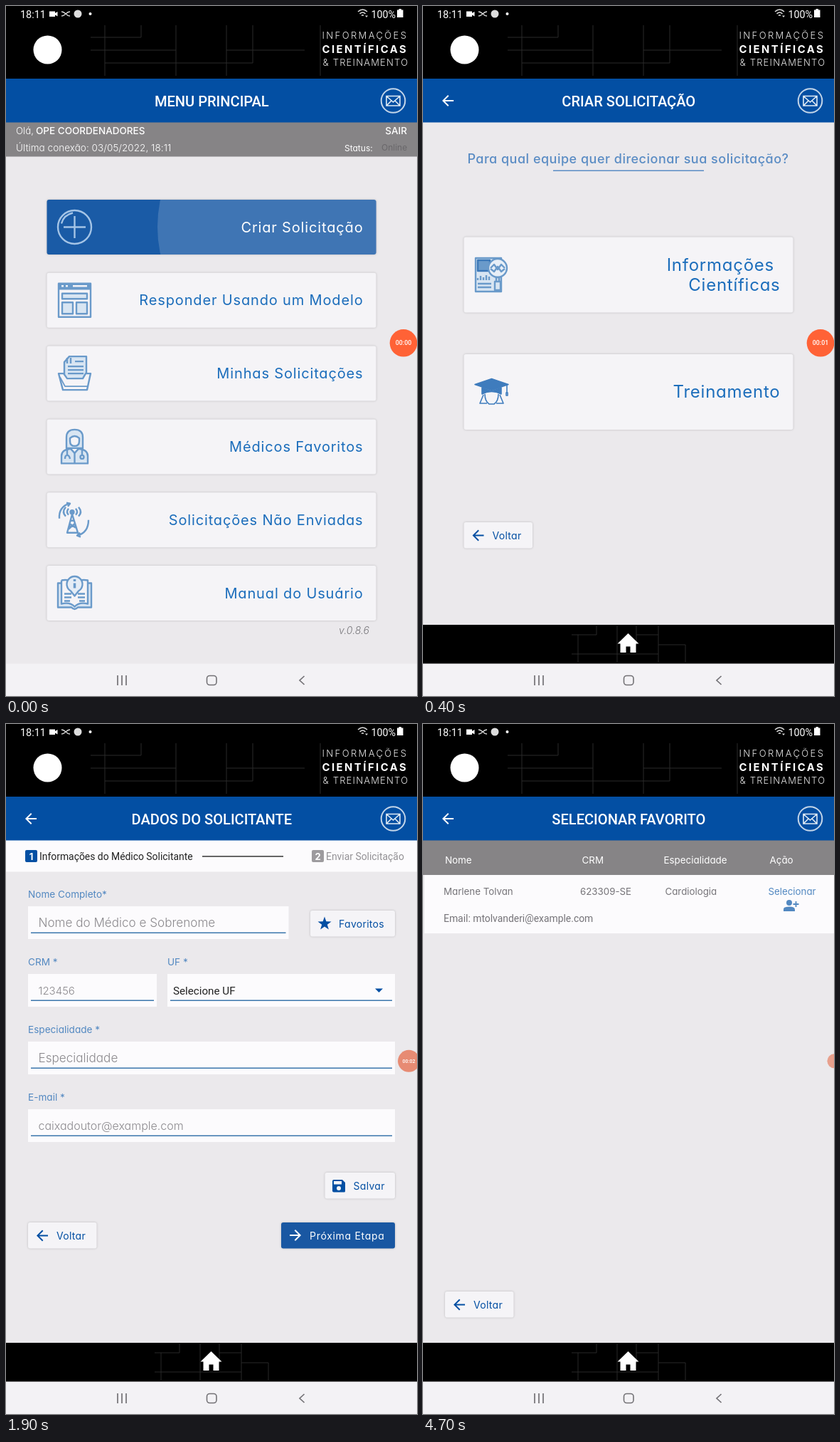
Animation of 578x969 px, one loop 5 s. Source, as an HTML page:

```html
<!DOCTYPE html>
<html lang="pt">
<head>
<meta charset="utf-8">
<title>Menu</title>
<style>
  html, body { margin: 0; width: 100%; height: 100%; overflow: hidden; background: #ebe9ec; }
  #stage { display: block; width: 100vw; height: 100vh; }
  text { font-family: Inter, sans-serif; font-feature-settings: "cv11"; white-space: pre; }
  .ui { font-family: Roboto, sans-serif; font-feature-settings: normal; }
  .card { filter: drop-shadow(0 .7px 1.5px rgba(0,0,0,.2)); }
  .raised { filter: drop-shadow(0 1px 4px rgba(0,0,0,.25)); }
  .icon { fill: none; stroke: #6a9aca; stroke-width: 2.4; stroke-linejoin: round; }
  .icon .f { fill: #6a9aca; }
  .icon .p { fill: #d8e5f2; }
</style>
</head>
<body>
<svg id="stage" viewBox="0 0 578 969" preserveAspectRatio="none"></svg>
<script>
const BLUE = '#034fa3', LINK = '#1b6dbb', LABEL = '#5288c1', GREY = '#868486', PAPER = '#f5f4f7', BG = '#ebe9ec';
const LOOP = 5000;

// Markup helpers
const text = (x, y, size, fill, str, extra = '') =>
  `<text x="${x}" y="${y}" font-size="${size}" fill="${fill}" ${extra}>${str}</text>`;
const rect = (x, y, w, h, fill, extra = '') =>
  `<rect x="${x}" y="${y}" width="${w}" height="${h}" fill="${fill}" ${extra}/>`;
const path = (d, extra = '') => `<path d="${d}" ${extra}/>`;
const circle = (x, y, r, extra = '') => `<circle cx="${x}" cy="${y}" r="${r}" ${extra}/>`;
const group = (x, y, body, extra = '') => `<g transform="translate(${x} ${y})" ${extra}>${body}</g>`;
const stroke = (color, width) => `fill="none" stroke="${color}" stroke-width="${width}"`;
const END = 'text-anchor="end"', MID = 'text-anchor="middle"', UI = 'class="ui"', LIGHT = 'font-weight="300"';
const card = (x, y, w, h, fill = PAPER, extra = '') => rect(x, y, w, h, fill, `rx="3" class="card" ${extra}`);
const ripple = (id, x, y, w, h, cx, cy, fill) =>
  `<svg x="${x}" y="${y}" width="${w}" height="${h}">${circle(cx - x, cy - y, 0, `id="${id}" fill="${fill}"`)}</svg>`;

const ARROW = 'M8-1H-4.2l5.6-5.6L0-8l-8 8 8 8 1.4-1.4L-4.2 1H8z';
const arrow = (x, y, fill, flip = 1) =>
  path(ARROW, `transform="translate(${x} ${y}) scale(${flip} 1)" fill="${fill}"`);

const icons = {
  plus: `<g stroke="#a4c4e6">${circle(24.5, 25, 23.5)}${path('M9 25H40M24.5 9.5V40.5M6 20Q9 8 22 5')}</g>`,
  template: path('M2 1.5H47V9H2z', 'class="f"') + path('M2 9V48.5H47V9') +
    path('M7 15.5H42V23H7zM7 28H22V44H7zM27 28H42V44H27z', 'class="p"') +
    path('M6 5H9M12 5H15M22 5H42', 'stroke="#f5f4f7"'),
  tray: path('M10 30V9L17 1H41V32', 'class="p"') + path('M14 11V3M19 11V3') +
    path('M25 8H37M15 15H37M15 20H37M15 25H37') +
    path('M2 25H9L14 32H36L40 25H47L42 48H8z', 'fill="#f5f4f7"') + path('M4 30L11 43H43', 'stroke-width="1.8"'),
  doctor: path('M13 27V12Q13 1 24.5 1T36 12V27z', 'class="p"') +
    path('M18 13Q24.5 7 31 13V17Q31 24 24.5 24T18 17z', 'fill="#f5f4f7"') +
    path('M19 28Q6 29 6 38V48.5H43V38Q43 29 30 28L24.5 34z', 'class="p"') +
    path('M14 29V38M35 29V37M11 42Q11 37 14 37T18 42M24.5 34V48') + circle(35, 39.5, 2.5),
  antenna: circle(21, 14, 2.5, 'class="f"') + path('M21 17L14 43H29zM18 26H24M16 34H27M17 30L26 36M25 30L16 38') +
    path('M16 18Q12 14 16 9M26 18Q30 14 26 9M12 20Q6 14 12 7M30 20Q36 14 30 7') +
    path('M3 23Q2 7 17 2M13 1L18 2 15 6M44 25Q44 43 28 47M32 43L28 47 33 49'),
  manual: path('M6 11H1V45H20Q24.5 50 29 45H48V11H43', 'class="p"') +
    path('M6 7V40Q18 37 24.5 44Q31 37 43 40V7Q30 5 24.5 12Q18 5 6 7', 'fill="#f5f4f7"') +
    path('M10 26H20M10 31H20M29 26H39M29 31H39M10 36H18M31 36H39') +
    path('M24.5 29L19 22A11 11 0 1 1 30 22z', 'fill="#e5edf6"') + path('M24.5 11V18M24.5 5.5V8.5', 'stroke-width="3.5"'),
  report: path('M2 2H38V49H2z', 'class="p"') + path('M5 5H22V20H5z', 'class="f" stroke="#3c78b8"') +
    path('M5 33V30M9 33V27M13 33V29M17 33V26M21 33V28M5 38H24M5 43H24') +
    circle(33, 16, 13, 'fill="#e8eff7"') + path('M23 16L28 11 33 18 38 11 43 16M23 17L28 21 33 14 38 21 43 17') +
    path('M29 35H37V47H29zM31 35V29H35V35', 'fill="#d8e5f2"'),
  cap: `<g stroke="#3f7cbd" stroke-width="1.6">${path('M1 14.5L24.5 6.5 48 14.5 24.5 22.5z', 'fill="#3f7cbd"')}` +
    path('M11 19V28Q24.5 21 38 28V19L24.5 24z', 'fill="#3f7cbd"') + path('M46 15V27M45 26V30H47V26z') +
    path('M15 28Q15 38 21 42H28Q34 38 34 28M13 29L8 41H18M36 29L41 41H31') + '</g>',
};
const icon = (name, x, y) => group(x, y, icons[name], 'class="icon"');

const backButton = (x, y) => card(x, y, 96.5, 36.5) + arrow(x + 20, y + 18.5, BLUE) +
  text(x + 40, y + 23.5, 14, BLUE, 'Voltar', 'letter-spacing=".3"');

function menuScreen() {
  const items = [['plus', 'Criar Solicitação'], ['template', 'Responder Usando um Modelo'],
    ['tray', 'Minhas Solicitações'], ['doctor', 'Médicos Favoritos'],
    ['antenna', 'Solicitações Não Enviadas'], ['manual', 'Manual do Usuário']];
  const rows = items.map(([name, label], i) => {
    const y = 272 + i * 102.8, first = !i;
    return card(57.5, y, 463, 77, first ? '#1a5ba6' : PAPER, first ? 'id="menuCard"' : '') +
      (first ? ripple('menuRipple', 57.5, y, 463, 77, 393, 310, 'rgba(255,255,255,.16)') : '') +
      icon(name, 72, y + 13.5) +
      text(502.5, y + 45.5, 20, first ? '#fff' : LINK, label, `${END} letter-spacing=".85"`);
  }).join('');
  return `<g id="menuList">${rows}${text(511, 882, 14, '#77767a', 'v.0.8.6', `${END} ${LIGHT} font-style="italic"`)}</g>` +
    rect(0, 163, 578, 48.5, GREY) +
    text(14, 180, 13.3, '#fff', 'Olá,', LIGHT) +
    text(42, 180, 13.5, '#fff', 'OPE COORDENADORES', 'font-weight="500"') +
    text(564, 180, 13.5, '#fff', 'SAIR', `${END} font-weight="500"`) +
    text(14, 204, 13.5, '#fff', 'Última conexão: 03/05/2022, 18:11', `${LIGHT} letter-spacing=".05"`) +
    text(476, 204, 12, '#fff', 'Status:') + text(528, 203, 12, '#69676a', 'Online');
}

function teamScreen() {
  const label = (x, y, str) => text(x, y, 24, LINK, str, `${END} letter-spacing=".75"`);
  return text(288.5, 221, 18, '#5a8cc4', 'Para qual equipe quer direcionar sua solicitação?',
      `${MID} font-weight="500" letter-spacing=".5"`) +
    rect(183, 230.5, 212, 1.5, '#5a8cc4') +
    card(57.5, 324.5, 463, 106, PAPER, 'id="teamCard"') + card(57.5, 489, 463, 106) +
    ripple('teamRipple', 57.5, 324.5, 463, 106, 290, 380, 'rgba(30,95,170,.13)') +
    icon('report', 72, 352) + icon('cap', 72, 517) +
    label(494, 371.5, 'Informações') + label(502.5, 400, 'Científicas') + label(502.5, 550, 'Treinamento') +
    backButton(57.5, 725);
}

function formScreen() {
  const label = (x, y, str) => text(x, y, 13.6, LABEL, str);
  const field = (x, y, w, hint, size = 17.1) => rect(x, y, w, 46, '#fcfbfd') +
    rect(x + 4, y + 36.5, w - 8, 1.5, '#3a76ac') + text(x + 14.5, y + 29, size, '#8b898d', hint, LIGHT);
  const action = (x, y, w, str, fill = PAPER, ink = BLUE, spacing = .3) =>
    card(x, y, w, 36.5, fill) + text(x + 40, y + 23.5, 14, ink, str, `letter-spacing="${spacing}"`);
  const step = (x, n, fill) => rect(x, 177, 17, 17, fill, 'rx="2"') +
    text(x + 8.5, 190.5, 13, '#fff', n, `${MID} font-weight="700"`);
  const star = Array.from({ length: 10 }, (_, i) => {
    const a = i * Math.PI / 5, r = i % 2 ? 4 : 10;
    return `${448 + r * Math.sin(a)},${280.5 - r * Math.cos(a)}`;
  }).join(' ');
  return rect(0, 163, 578, 44.5, '#fcfbfd') +
    step(27, 1, BLUE) + text(47, 190.5, 13.9, '#222', 'Informações do Médico Solicitante', UI) +
    rect(276, 185, 114, 1.8, '#555') +
    step(430, 2, '#9d9b9e') + text(450, 190.5, 13.9, '#939195', 'Enviar Solicitação', UI) +
    label(31, 244, 'Nome Completo*') + field(31, 256, 366.5, 'Nome do Médico e Sobrenome') +
    label(31, 339, 'CRM *') + field(31, 351, 181, '123456', 15) +
    label(227, 339, 'UF *') + field(227, 351, 320, '') +
    text(235, 379.5, 15.2, '#222', 'Selecione UF', UI) + path('M519 371.5H530L524.5 377z', `fill="${BLUE}"`) +
    label(31, 434, 'Especialidade *') + field(31, 446, 516, 'Especialidade') +
    label(31, 529, 'E-mail *') + field(31, 541, 516, 'caixadoutor@example.com', 16) +
    action(428, 262, 119, 'Favoritos') + ripple('favRipple', 428, 262, 119, 36.5, 487, 280, 'rgba(30,95,170,.13)') +
    `<polygon points="${star}" fill="${BLUE}"/>` +
    action(448.5, 630, 98.5, 'Salvar') +
    path('M461 640H473L477 644V656Q477 657.5 475.5 657.5H461Q459 657.5 459 655.5V642Q459 640 461 640z', `fill="${BLUE}"`) +
    rect(461, 642, 11, 4.5, PAPER) + circle(468, 652, 3, `fill="${PAPER}"`) +
    backButton(31, 700) +
    action(387, 700, 160, 'Próxima Etapa', '#1957a2', '#fff', .7) + arrow(407, 718, '#fff', -1);
}

function favoritesScreen() {
  const head = (x, str) => text(x, 195.5, 13.4, '#fff', str);
  const cell = (x, str, fill = '#757378') => text(x, 239.5, 13.3, fill, str);
  return rect(0, 163, 578, 49, GREY) +
    head(31, 'Nome') + head(223.5, 'CRM') + head(338.5, 'Especialidade') + head(487.5, 'Ação') +
    rect(2, 212, 576, 82, '#fcfbfd') +
    cell(29, 'Marlene Tolvan') + cell(221, '623309-SE') + cell(340.5, 'Cardiologia') + cell(485.5, 'Selecionar', LABEL) +
    circle(515, 251, 4, `fill="${LABEL}"`) + path('M507 263V260.5Q507 256.5 515 256.5T523 260.5V263z', `fill="${LABEL}"`) +
    path('M524.5 249V257M520.5 253H528.5', stroke(LABEL, 1.8)) +
    text(29, 278, 13.9, '#757378', 'Email: mtolvanderi@example.com', UI) +
    backButton(31, 797);
}

function statusAndBrand() {
  return rect(0, 0, 578, 102, '#000') +
    path('M139 27V98M119 44H190V27M119 62H239M239 27V98M310 27V98M310 62H420M139 80H347V27M442 27V98', stroke('#2b2b2b', 1)) +
    text(20, 16.5, 14.4, '#fff', '18:11', UI) +
    path('M61 7.5H69V10L72.5 8V14.5L69 12.5V15H61z', 'fill="#fff"') +
    path('M78 14Q81 14 84 11T90 8M78 8Q81 8 84 11T90 14', stroke('#ddd', 1.3)) +
    circle(101, 11, 5.5, 'fill="#ddd"') + circle(118.5, 11, 2, 'fill="#fff"') +
    path('M495 8Q501.5 2 508 8M497.5 11Q501.5 7 505.5 11M500 13.5Q501.5 12 503 13.5', stroke('#ddd', 1.5)) +
    path('M505 13.5L507 16 509 13.5z', 'fill="#ddd"') +
    text(513.5, 16.5, 14.3, '#fff', '100%', UI) + path('M550 5.5H552.5V4H556V5.5H558.5V16H550z', 'fill="#fff"') +
    circle(58.5, 61.5, 20, 'fill="#fff"') +
    text(444.5, 45.5, 13, '#e8e8e8', 'INFORMAÇÕES', `${LIGHT} letter-spacing="2.4"`) +
    text(444.5, 65.5, 14.8, '#fff', 'CIENTÍFICAS', 'font-weight="700" letter-spacing="2.5"') +
    text(445.5, 84, 13, '#e8e8e8', '&amp; TREINAMENTO', `${LIGHT} letter-spacing="1.2"`);
}

const titleBar = rect(0, 102, 578, 61.5, BLUE) +
  text(289.3, 140.5, 20.1, '#fff', '', `id="title" ${UI} ${MID} font-weight="500"`) +
  circle(544.5, 133, 16.8, stroke('#c3d5e9', 2)) +
  path('M535 126.5H554V140H535zM535 126.5L544.5 135 554 126.5M535 140L542 133M554 140L547 133', stroke('#e3ecf5', 1.6));

const homeBar = rect(0, 869, 578, 55, '#000') +
  path('M209 883H244V870M218 883V922M209 910H331M273 870V922M300 870V897M331 870V922M300 883H331M331 897H369V922', stroke('#292929', 1)) +
  path('M288.5 881L273.5 895.5H277.5V908H285.5V899.5H291.5V908H299.5V895.5H303.5z', 'fill="#fff"');

const systemNav = rect(0, 923.5, 578, 46, '#f3f2f5') +
  path('M157 940V954M163 940V954M169 940V954', stroke('#737276', 1.7)) +
  rect(282.5, 940.5, 13.5, 13, 'none', 'rx="4" stroke="#737276" stroke-width="1.6"') +
  path('M419.5 941L413 947 419.5 953', stroke('#737276', 1.7));

const screens = { menu: menuScreen, team: teamScreen, form: formScreen, favorites: favoritesScreen };
const stage = document.getElementById('stage');
stage.innerHTML = rect(0, 0, 578, 969, BG) +
  Object.entries(screens).map(([id, build]) => `<g id="${id}">${build()}</g>`).join('') +
  statusAndBrand() + titleBar +
  `<g id="nav">${arrow(35, 133, '#fff')}${homeBar}</g>` + systemNav +
  `<g id="badge">${circle(0, 0, 19.3, 'id="disc"')}` +
  text(0, 3, 8.8, '#fff', '', `id="timer" ${UI} ${MID} font-weight="500"`) + '</g>';

const el = id => document.getElementById(id);
const set = (id, attrs) => Object.entries(attrs).forEach(([k, v]) => el(id).setAttribute(k, v));
const mix = (a, b, p) => a + (b - a) * p;
const progress = (t, from, to) => Math.min(1, Math.max(0, (t - from) / (to - from)));
const latest = (t, cues) => cues.filter(([at]) => t >= at).pop()[1];

const screenCues = [[0, 'menu'], [300, 'team'], [1900, 'form'], [3200, 'favorites']];
const titleCues = [[0, 'MENU PRINCIPAL'], [200, 'CRIAR SOLICITAÇÃO'], [1600, 'DADOS DO SOLICITANTE'], [3100, 'SELECIONAR FAVORITO']];
const timerCues = [[0, '00:00'], [400, '00:01'], [1400, '00:02'], [2400, '00:03']];

function render(time) {
  const t = Math.floor(time % LOOP / 100) * 100;
  const current = latest(t, screenCues);
  for (const id in screens) set(id, { display: id === current ? 'inline' : 'none' });
  el('title').textContent = latest(t, titleCues);
  el('timer').textContent = latest(t, timerCues);
  set('nav', { display: t >= 200 ? 'inline' : 'none' });

  set('menuList', { transform: `translate(0 ${t >= 200 ? -35 : 0})` });
  set('menuRipple', { r: 180 + t * 2.2 });
  set('menuCard', { class: t >= 100 ? 'raised' : 'card' });
  set('teamRipple', { r: t >= 1300 && t < 1600 ? 90 + (t - 1300) * 1.1 : 0 });
  set('teamCard', { class: t >= 1300 ? 'raised' : 'card' });
  set('favRipple', { r: t >= 3000 && t < 3100 ? 45 : 0 });

  // The recorder badge fades and shrinks, then docks at the right edge.
  const fade = progress(t, 1300, 1600), dock = progress(t, 3100, 3400);
  const x = mix(mix(559, 566.5, fade), 578.5, dock);
  const scale = mix(mix(1, .8, fade), .52, dock);
  const rgb = [[255, 231, 232], [98, 139, 160], [54, 115, 141]].map(([a, b, c]) => Math.round(mix(mix(a, b, fade), c, dock)));
  set('badge', { transform: `translate(${x} 473.3) scale(${scale})` });
  set('disc', { fill: `rgb(${rgb})` });
  set('timer', { opacity: 1 - dock });
}

const start = performance.now();
(function tick() {
  render(performance.now() - start);
  requestAnimationFrame(tick);
})();
</script>
</body>
</html>
```
